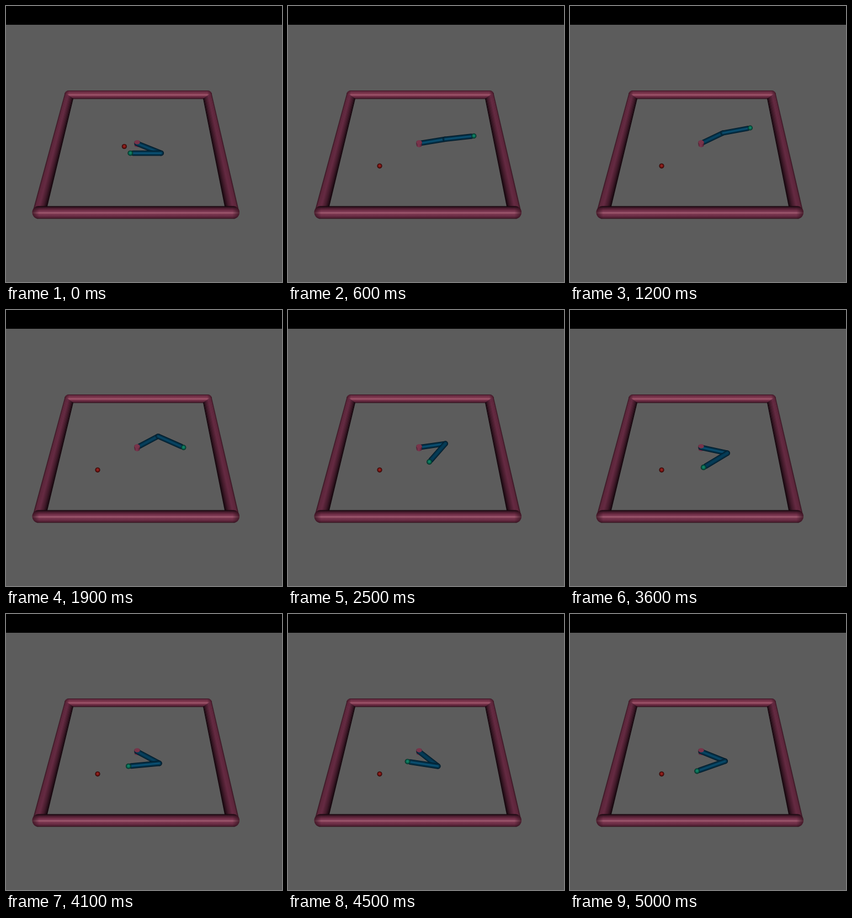
These frames come from a looping animation (500 by 500 pixels, 5100 ms). An HTML page with a canvas:

```html
<!DOCTYPE html>
<html lang="en">
<head>
<meta charset="utf-8">
<title>Two-link reaching arm</title>
<style>
  html, body { margin: 0; width: 100%; height: 100%; overflow: hidden; background: #5c5c5c; }
  canvas { display: block; width: 500px; height: 500px; }
</style>
</head>
<body>
<canvas id="stage" width="500" height="500"></canvas>
<script>
const ctx = document.getElementById('stage').getContext('2d');
const LOOP = 5100, STEP = 100;
const LINK = 1 / 3, TIP = 0.367;
const RAD = Math.PI / 180;

// time in ms, shoulder angle, elbow angle relative to the first link
const poses = [
  [100, 1, 1], [600, 13, -4], [1200, 34.4, -19.5], [1600, 41, -45],
  [1900, 37.2, -70.7], [2400, 15.5, -125], [2500, 11.5, -134.8],
  [3000, 0, -143], [3600, -16.8, -124.2], [4500, -47.4, -144.3],
  [5000, -29.5, -125]
];
const startPose = [-29.5, -150.5];

const mix = (a, b, f) => a + (b - a) * f;

// Smooth curve through the poses
function poseAt(t) {
  const last = poses.length - 1;
  let i = 0;
  while (i < last - 1 && t > poses[i + 1][0]) i++;
  const a = poses[i], b = poses[i + 1], h = b[0] - a[0];
  const s = Math.min(1, (t - a[0]) / h), s2 = s * s, s3 = s2 * s;
  const slope = (j, k) => {
    const p = poses[Math.max(0, j - 1)], n = poses[Math.min(last, j + 1)];
    return (n[k] - p[k]) / (n[0] - p[0]);
  };
  return [1, 2].map(k =>
    (2 * s3 - 3 * s2 + 1) * a[k] + (s3 - 2 * s2 + s) * h * slope(i, k) +
    (3 * s2 - 2 * s3) * b[k] + (s3 - s2) * h * slope(i + 1, k));
}

// Table plane to screen, with perspective
function project(u, v) {
  const w = 1 + 0.171 * v;
  return { x: 249 + (147.6 * u - 11.7) / w, y: -361 + 610 / w, k: 1 / w };
}

function addStops(gradient, stops) {
  for (const [at, color] of stops) gradient.addColorStop(at, color);
  return gradient;
}

// Colour of a ramp at position f
function shade(stops, f) {
  let i = 0;
  while (i < stops.length - 2 && f > stops[i + 1][0]) i++;
  const [p, c] = stops[i], [q, d] = stops[i + 1];
  const part = (s, j) => parseInt(s.slice(1 + 2 * j, 3 + 2 * j), 16);
  const m = (f - p) / (q - p);
  return 'rgb(' + [0, 1, 2].map(j => Math.round(mix(part(c, j), part(d, j), m))) + ')';
}

function ball(x, y, r, light, mid, dark) {
  ctx.fillStyle = addStops(ctx.createRadialGradient(x, y - r * 0.15, 0, x, y, r),
    [[0, light], [0.55, mid], [1, dark]]);
  ctx.beginPath();
  ctx.arc(x, y, r, 0, 7);
  ctx.fill();
}

// Horizontal wall: shaded across, darker at its rounded ends
function beam(x, y, w, h, stops) {
  ctx.beginPath();
  ctx.roundRect(x, y, w, h, h / 2);
  ctx.fillStyle = addStops(ctx.createLinearGradient(0, y, 0, y + h), stops);
  ctx.fill();
  const end = h * 0.55 / w, clear = 'rgba(40,12,22,0)', dark = 'rgba(40,12,22,0.7)';
  ctx.fillStyle = addStops(ctx.createLinearGradient(x, 0, x + w, 0),
    [[0, dark], [end, clear], [1 - end, clear], [1, dark]]);
  ctx.fill();
}

// Tapered side wall in lengthwise strips, mitred at the far corner
function sideWall(outFar, inFar, outNear, inNear, stops) {
  const n = 16, far = 160, near = 375;
  const edge = (f, y) =>
    mix(mix(outFar, inFar, f), mix(outNear, inNear, f), (y - far) / (near - far));
  for (let i = 0; i < n; i++) {
    const a = i / n, b = Math.min(1, (i + 1.4) / n);
    const ya = 157 + 11 * a, yb = 157 + 11 * b;
    ctx.fillStyle = shade(stops, (i + 0.5) / n);
    ctx.beginPath();
    ctx.moveTo(edge(a, ya), ya);
    ctx.lineTo(edge(b, yb), yb);
    ctx.lineTo(edge(b, near), near);
    ctx.lineTo(edge(a, near), near);
    ctx.fill();
  }
}

function drawRoom() {
  ctx.fillStyle = '#5c5c5c';
  ctx.fillRect(0, 0, 500, 500);
  ctx.fillStyle = '#000';
  ctx.fillRect(0, 0, 500, 34);
  const side = [[0, '#32131f'], [0.12, '#5d263b'], [0.4, '#662a42'],
    [0.72, '#421a2a'], [1, '#10050a']];
  beam(106, 153, 267, 15.5, [[0, '#35141f'], [0.12, '#652a40'], [0.38, '#80384f'],
    [0.52, '#a25a70'], [0.66, '#78324a'], [0.85, '#582338'], [1, '#2c0e19']]);
  sideWall(106, 123.9, 47.5, 72.1, side);
  sideWall(373, 355.4, 423, 398.4, side);
  beam(47.5, 362.5, 375.5, 23, [[0, '#10050a'], [0.14, '#43192a'], [0.35, '#722f48'],
    [0.47, '#84405a'], [0.54, '#a86276'], [0.61, '#7e3a53'], [0.78, '#6a2c44'],
    [0.92, '#4f1f32'], [1, '#2c0e19']]);
}

function drawLink(a, b) {
  const flat = Math.abs(b.x - a.x) / Math.hypot(b.x - a.x, b.y - a.y);
  const shine = Math.max(0, flat - 0.85) / 0.15;
  const k = (a.k + b.k) / 2;
  const layers = [[9.6, '#021a28'], [7.8, '#032a3f'], [5.4, '#04364f'],
    [2.2, shade([[0, '#053c58'], [1, '#0c5478']], shine)]];
  ctx.lineCap = 'round';
  for (const [w, color] of layers) {
    ctx.strokeStyle = color;
    ctx.lineWidth = w * k;
    ctx.beginPath();
    ctx.moveTo(a.x, a.y);
    ctx.lineTo(b.x, b.y);
    ctx.stroke();
  }
}

function drawPost() {
  ctx.fillStyle = addStops(ctx.createLinearGradient(232, 0, 243, 0),
    [[0, '#4a1c2e'], [0.35, '#7a354d'], [0.65, '#703048'], [1, '#431929']]);
  ctx.beginPath();
  ctx.ellipse(237.6, 247, 5.3, 3.8, 0, Math.PI, 0);
  ctx.ellipse(237.6, 252.2, 4.9, 3.7, 0, 0, Math.PI);
  ctx.fill();
}

function drawCap() {
  ctx.fillStyle = '#78344a';
  ctx.beginPath();
  ctx.ellipse(237.6, 247, 5.1, 3.7, 0, 0, 7);
  ctx.fill();
}

function drawArm([q1, q2]) {
  const a1 = q1 * RAD, a2 = (q1 + q2) * RAD;
  const u = LINK * Math.cos(a1), v = LINK * Math.sin(a1);
  const reach = d => project(u + d * Math.cos(a2), v + d * Math.sin(a2));
  const root = project(0, 0), elbow = project(u, v);
  const end = reach(LINK), tip = reach(TIP);
  if (q1 < 0) drawPost();
  drawLink(root, elbow);
  drawLink(elbow, end);
  if (q1 >= 0) drawPost();
  drawCap();
  ball(tip.x, tip.y, 4.8 * tip.k, '#159070', '#086650', '#02281f');
}

function draw(now) {
  const t = Math.floor((now % LOOP) / STEP) * STEP;
  const first = t < STEP;
  drawRoom();
  ball(first ? 214.3 : 166, first ? 254.5 : 289.8, 4.6, '#a32a25', '#741412', '#260303');
  drawArm(first ? startPose : poseAt(t));
}

const begin = performance.now();
function tick() {
  draw(performance.now() - begin);
  requestAnimationFrame(tick);
}
tick();
</script>
</body>
</html>
```
